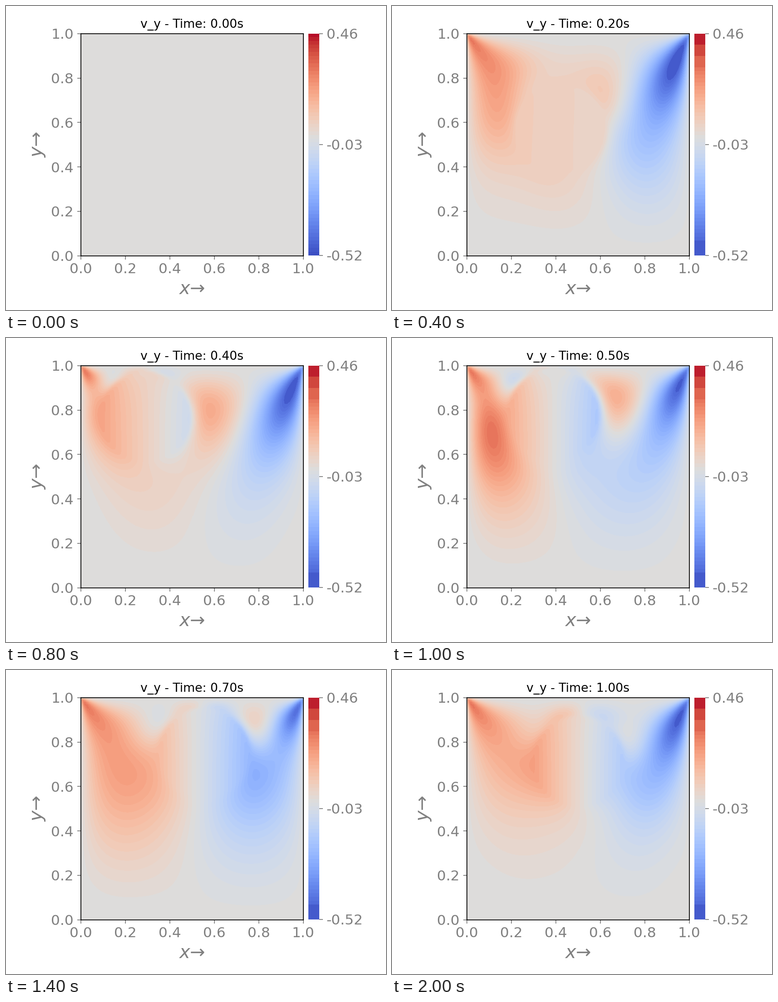
These frames come from a looping animation (837x669 px, 2200 ms). A matplotlib script:

```python
import numpy as np
import matplotlib
import matplotlib.pyplot as plt
from matplotlib.animation import FuncAnimation

W, H, DPI = 837, 669, 160
FRAMES, INTERVAL = 11, 200
V_MIN, V_MAX, BANDS = -0.52, 0.46, 59

# Lid-driven cavity with a disc carried around by the flow
CELLS = 88
STEP = 1 / CELLS
SUBSTEPS = 360            # per frame, one frame being one time unit
DT = 1 / SUBSTEPS
VISCOSITY = 0.01
LID = 1.0
RADIUS = 0.2
SPIN = -0.92

# Disc centre at a few moments: time, x, y
ROUTE = np.array([(0, 0.60, 0.50), (2, 0.42, 0.57), (4, 0.29, 0.765),
                  (5, 0.39, 0.78), (6, 0.485, 0.78), (8, 0.60, 0.71),
                  (9, 0.57, 0.685), (10, 0.50, 0.71), (11, 0.46, 0.75)])
WHEN, WHERE = ROUTE[:, 0], ROUTE[:, 1:]
SPEED = np.zeros_like(WHERE)
SPEED[1:-1] = (WHERE[2:] - WHERE[:-2]) / (WHEN[2:] - WHEN[:-2])[:, None]


def centre(t):
    """Smooth cubic path through the route points."""
    k = np.searchsorted(WHEN, t, side="right") - 1
    span = WHEN[k + 1] - WHEN[k]
    s = (t - WHEN[k]) / span
    ease = s * s * (3 - 2 * s)
    return (WHERE[k] * (1 - ease) + WHERE[k + 1] * ease
            + span * s * (1 - s) * ((1 - s) * SPEED[k] - s * SPEED[k + 1]))


def smoothstep(s):
    s = min(max(s, 0), 1)
    return s * s * (3 - 2 * s)


edges = np.linspace(0, 1, CELLS + 1)
mids = edges[:-1] + STEP / 2
UX, UY = np.meshgrid(edges, mids)
VX, VY = np.meshgrid(mids, edges)

# Cosine basis for the pressure equation
modes = np.arange(CELLS)
COS = np.cos(np.pi * np.outer(modes, mids)) * np.sqrt(2 / CELLS)
COS[0] /= np.sqrt(2)
eigen = 2 * np.cos(np.pi * modes / CELLS) - 2
EIGEN = eigen[:, None] + eigen[None, :]
EIGEN[0, 0] = 1


def cover(x, y, c):
    gap = RADIUS - np.hypot(x - c[0], y - c[1])
    return np.clip(0.5 + gap / (2 * STEP), 0, 1)


def push(u, v):
    """Advection and friction over one small step."""
    tall = np.vstack([-u[:1], u, 2 * LID - u[-1:]])
    wide = np.hstack([-v[:, :1], v, -v[:, -1:]])
    cross = (tall[1:] + tall[:-1]) * (wide[:, 1:] + wide[:, :-1]) / 4
    uu = ((u[:, 1:] + u[:, :-1]) / 2) ** 2
    vv = ((v[1:] + v[:-1]) / 2) ** 2
    lap_u = (u[:, 2:] + u[:, :-2] + tall[2:, 1:-1] + tall[:-2, 1:-1]
             - 4 * u[:, 1:-1])
    lap_v = (v[2:] + v[:-2] + wide[1:-1, 2:] + wide[1:-1, :-2]
             - 4 * v[1:-1])
    du = (VISCOSITY * lap_u / STEP
          - np.diff(uu, axis=1) - np.diff(cross, axis=0)[:, 1:-1])
    dv = (VISCOSITY * lap_v / STEP
          - np.diff(vv, axis=0) - np.diff(cross, axis=1)[1:-1])
    u[:, 1:-1] += DT / STEP * du
    v[1:-1] += DT / STEP * dv


def carry(u, v, t):
    """Give the cells under the disc its rigid motion."""
    c = centre(t)
    rise = (centre(t + DT) - c) / DT
    spin = SPIN * smoothstep((t - 1.2) / 4.2)
    u += cover(UX, UY, c) * (rise[0] - spin * (UY - c[1]) - u)
    v += cover(VX, VY, c) * (rise[1] + spin * (VX - c[0]) - v)


def project(u, v):
    """Remove the divergence."""
    div = np.diff(u, axis=1) + np.diff(v, axis=0)
    p = COS.T @ ((COS @ div @ COS.T) / EIGEN) @ COS
    u[:, 1:-1] -= np.diff(p, axis=1)
    v[1:-1] -= np.diff(p, axis=0)


def simulate():
    u, v = np.zeros_like(UX), np.zeros_like(VX)
    shots = [v.copy()]
    for n in range((FRAMES - 1) * SUBSTEPS):
        push(u, v)
        carry(u, v, n * DT)
        project(u, v)
        if (n + 1) % SUBSTEPS == 0:
            shots.append(v.copy())
    return shots


# Linear resampling from the grid to the picture
PIXELS = 490
fine = (np.arange(PIXELS) + 0.5) / PIXELS


def weights(knots):
    return np.array([np.interp(fine, knots, row) for row in np.eye(len(knots))])


TO_X = weights(np.concatenate([[0], mids, [1]]))[1:-1]
TO_Y = weights(edges).T


def bands(v):
    level = (TO_Y @ v @ TO_X - V_MIN) / (V_MAX - V_MIN)
    return np.clip((level * BANDS).astype(int), 0, BANDS - 1)


def palette(band):
    mid = V_MIN + (np.arange(BANDS) + 0.5) * (V_MAX - V_MIN) / BANDS
    pos = np.where(mid < 0, 0.5 - 0.5 * mid / V_MIN, 0.5 + 0.5 * mid / V_MAX)
    cols = matplotlib.colormaps["coolwarm"](pos)[:, :3]
    if band.min() < band.max():
        # Colours at the ends that the field hardly uses run together
        cols[:4] = cols[:4].mean(axis=0)
        for top in range(BANDS, band.max() + 3, -3):
            cols[top - 3:top] = cols[top - 3:top].mean(axis=0)
    return cols


def box(left, top, right, bottom):
    return [left / W, 1 - bottom / H, (right - left) / W, (bottom - top) / H]


def picture(where, shape):
    axes = fig.add_axes(where)
    shown = axes.imshow(np.zeros(shape + (3,)), origin="lower",
                        extent=(0, 1, 0, 1), aspect="auto",
                        interpolation="nearest")
    axes.tick_params(colors="gray", labelsize=14)
    return axes, shown


plt.rcParams["font.family"] = "DejaVu Sans"
fig = plt.figure(figsize=(W / DPI, H / DPI), dpi=DPI, facecolor="white")

ax, image = picture(box(164.5, 61, 654.5, 549.5), (PIXELS, PIXELS))
ticks = np.linspace(0, 1, 6)
names = [f"{v:.1f}" for v in ticks]
ax.set_xticks(ticks, names)
ax.set_yticks(ticks, names)
ax.set_xlabel("$x$→", fontsize=18, color="gray")
ax.set_ylabel("$y$→", fontsize=18, color="gray")
title = ax.set_title("", fontsize=12)

bar_ax, bar = picture(box(666, 60.5, 690, 549), (BANDS, 1))
bar_ax.spines[:].set_visible(False)
bar_ax.set_xticks([])
bar_ax.yaxis.tick_right()
bar_ax.set_yticks([0, 0.5, 1],
                  [f"{v:.2f}" for v in (V_MIN, (V_MIN + V_MAX) / 2, V_MAX)])

SHOTS = simulate()


def draw(i):
    band = bands(SHOTS[i])
    cols = palette(band)
    image.set_data(cols[band])
    bar.set_data(cols[:, None, :])
    title.set_text(f"v_y - Time: {i / 10:.2f}s")
    return image, bar, title


anim = FuncAnimation(fig, draw, frames=FRAMES, interval=INTERVAL,
                     init_func=lambda: draw(0), repeat=True, repeat_delay=0,
                     blit=False)
plt.show()
```
